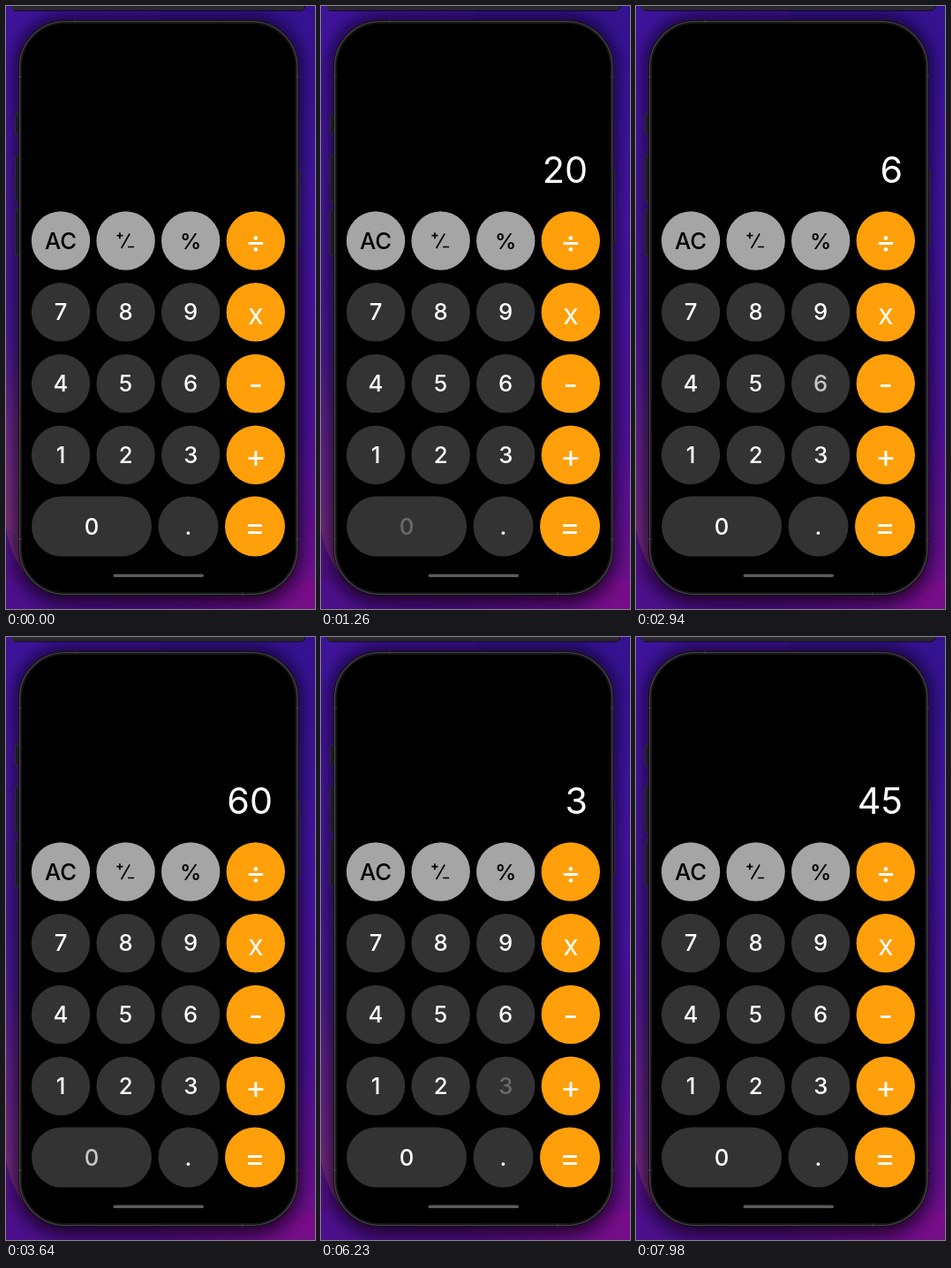
Animation of 350x682 px, one loop 8000 ms. Source, as an HTML page:

```html
<!DOCTYPE html>
<html lang="en">
<head>
<meta charset="utf-8">
<title>Calculator</title>
<style>
html, body { margin: 0; width: 100%; height: 100%; overflow: hidden; background: #35127e; }
svg { display: block; width: 350px; height: 682px; }
text { font-family: Inter, Roboto, sans-serif; text-anchor: middle; }
</style>
</head>
<body>
<svg id="stage" viewBox="0 0 350 682" xmlns="http://www.w3.org/2000/svg">
  <defs>
    <linearGradient id="wall" x1="0" y1="0" x2="0" y2="1">
      <stop offset="0" stop-color="#3d139a"/>
      <stop offset=".2" stop-color="#45159c"/>
      <stop offset=".45" stop-color="#461894"/>
      <stop offset=".7" stop-color="#521c8c"/>
      <stop offset=".88" stop-color="#521388"/>
      <stop offset="1" stop-color="#4c0c80"/>
    </linearGradient>
    <linearGradient id="right" x1="0" y1="0" x2="0" y2="1">
      <stop offset="0" stop-color="#34128f"/>
      <stop offset=".35" stop-color="#4314a2"/>
      <stop offset=".7" stop-color="#4c1198"/>
      <stop offset="1" stop-color="#740f8a"/>
    </linearGradient>
    <linearGradient id="floor" x1="0" y1="0" x2="1" y2="0">
      <stop offset="0" stop-color="#4c108c"/>
      <stop offset=".45" stop-color="#520d84"/>
      <stop offset="1" stop-color="#780d88"/>
    </linearGradient>
    <linearGradient id="pink" x1="0" y1="0" x2="0" y2="1">
      <stop offset="0" stop-color="#7a3080" stop-opacity="0"/>
      <stop offset=".6" stop-color="#7a3080" stop-opacity=".6"/>
      <stop offset="1" stop-color="#803078" stop-opacity=".9"/>
    </linearGradient>
    <filter id="blur" x="-20%" y="-20%" width="140%" height="140%"><feGaussianBlur stdDeviation="9"/></filter>
  </defs>

  <rect width="350" height="682" fill="url(#wall)"/>
  <rect x="175" width="175" height="682" fill="url(#right)"/>
  <rect y="650" width="350" height="32" fill="url(#floor)"/>
  <path d="M0 400H20V640Q6 622 0 592Z" fill="url(#pink)"/>
  <path id="glow" d="M0 380H20V610L0 588Z" fill="url(#pink)"/>
  <rect x="11" y="12" width="323" height="664" rx="56" fill="#0c0318" opacity=".8" filter="url(#blur)"/>
  <path d="M0 0H339V1Q339 5 334 5H9Q6 5 6 0Z" fill="#2b2830"/>
  <path d="M9 5.2H334Q338.500 5 338.500 0" fill="none" stroke="#0e0a18"/>

  <g fill="#1d1b22" stroke="#343239" stroke-width=".7">
    <rect x="10.500" y="122" width="5" height="23" rx="1.500"/>
    <rect x="10.500" y="169" width="5" height="52" rx="1.500"/>
    <rect x="10.500" y="230" width="5" height="52" rx="1.500"/>
    <rect x="329" y="185" width="4" height="85" rx="1.500"/>
  </g>
  <rect x="14" y="16" width="317.500" height="651" rx="53" fill="#0e0d10"/>
  <rect x="15.500" y="17.500" width="314.500" height="648" rx="51.500" fill="#161617" stroke="#48474a" stroke-width="1.200"/>
  <rect x="18" y="20" width="309.500" height="643" rx="49" fill="#000"/>
  <path d="M14 80H18M328 80H332M14 603H18M328 603H332M78 16V19M268 663V667" stroke="#3c3c40"/>
  <rect x="121.500" y="642.500" width="102.500" height="3.500" rx="1.750" fill="#5b5b5b"/>

  <g id="keys"></g>
  <text id="display" x="302" y="200" font-size="41.300" fill="#fff" style="text-anchor:end"></text>
</svg>
<script>
const LOOP = 8000, STEP = 70;
const GREY = '#a5a5a5', DARK = '#333333', ORANGE = '#ff9f0a';
const keysLayer = document.getElementById('keys');
const display = document.getElementById('display');
const glow = document.getElementById('glow');
const labels = {};

function add(tag, attrs, text) {
  const el = document.createElementNS('http://www.w3.org/2000/svg', tag);
  for (const name in attrs) el.setAttribute(name, attrs[name]);
  if (text) el.textContent = text;
  keysLayer.appendChild(el);
  return el;
}

function addKey(name, x, y, w, h, fill) {
  add('rect', { x: x - w / 2, y: y - h / 2, width: w, height: h, rx: h / 2, fill });
  if (name === '±') {
    add('path', {
      d: `M${x - 10.2} ${y - 5.8}h7M${x - 6.7} ${y - 9.3}v7M${x + 4.5} ${y - 8}L${x - 5} ${y + 8.5}M${x + 2.5} ${y + 7}h7`,
      fill: 'none', stroke: '#000', 'stroke-width': 1.7
    });
    return;
  }
  const operator = fill === ORANGE;
  const size = name === 'x' ? 32.5 : operator ? 36 : name === '%' ? 24.5 : 25.7;
  labels[name] = add('text', {
    x, y: y + (operator ? 13.8 : 9.2),
    'font-size': size, 'font-weight': operator ? 400 : 500,
    fill: fill === GREY ? '#000' : '#fff'
  }, name);
}

['AC ± % ÷', '7 8 9 x', '4 5 6 -', '1 2 3 +'].forEach((row, r) =>
  row.split(' ').forEach((name, c) =>
    addKey(name, 62 + c * 73.6, 265.5 + r * 80.75, 66.4, 66.4,
      c === 3 ? ORANGE : r === 0 ? GREY : DARK)));
addKey('0', 97, 588.5, 136, 68, DARK);
addKey('.', 206.5, 588.5, 68, 68, DARK);
addKey('=', 282, 588.5, 68, 68, ORANGE);

// key, time down, time up, display after release
const taps = [
  ['2', 490, 560, '2'], ['0', 1190, 1260, '20'], ['+', 1960, 2100, '20'],
  ['6', 2660, 2800, '6'], ['0', 3360, 3500, '60'], ['=', 4130, 4270, '80'],
  ['-', 5530, 5670, '80'], ['3', 6090, 6230, '3'], ['5', 6650, 6790, '35'],
  ['=', 7560, 7700, '45']
];

function labelOpacity(t, up) {
  if (t < up) return 0.2;
  const p = Math.min(1, (t - up + 60) / 330);
  return 0.2 + 0.8 * p * p * (3 - 2 * p);
}

function draw(time) {
  const t = Math.floor((time % LOOP) / STEP) * STEP;
  let shown = '';
  for (const name in labels) labels[name].setAttribute('opacity', 1);
  for (const [name, down, up, value] of taps) {
    if (t >= down) labels[name].setAttribute('opacity', labelOpacity(t, up));
    if (t >= up) shown = value;
  }
  display.textContent = shown;
  glow.setAttribute('opacity', Math.max(0, 1 - t / 350));
}

const start = performance.now();
function tick() {
  draw(performance.now() - start);
  requestAnimationFrame(tick);
}
draw(0);
requestAnimationFrame(tick);
</script>
</body>
</html>
```
